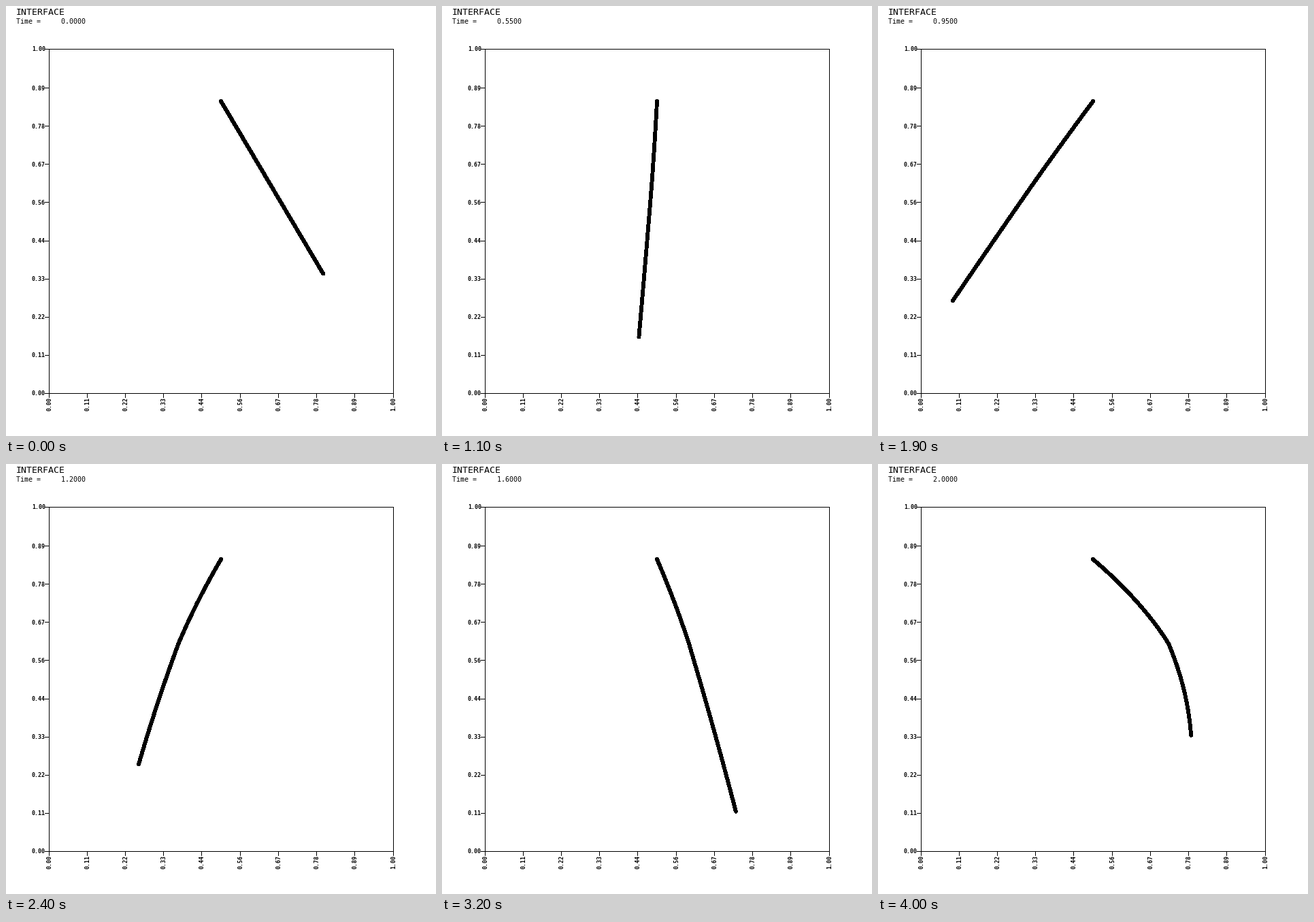
Write a matplotlib script that moves like this. It is 632 px wide and 632 px high and loops after 4.1 s.

```python
import numpy as np
import matplotlib.pyplot as plt
from matplotlib.animation import FuncAnimation

SIZE, DPI = 632, 64
PX = 72 / DPI                      # points per pixel
LEFT, RIGHT = 63, 569
PIVOT_X, PIVOT_Y = 316, 140
KNEE_DROP = 124                    # the filament bends at this depth
LAST, DT = 40, 0.05


def cosd(degrees):
    return np.cos(np.radians(degrees))


def tip(step):
    """Offset of the free end: a swing plus the bounce of a stretchy cord."""
    tau = step - 19.05
    c = cosd(10.12 * tau)
    x = -(181 + 0.2 * tau) * c - 25 * c ** 4
    a = 9.18 * (step - 19.3)
    y = 320 - 2 * cosd(a) - 47 * cosd(2 * a) + 22 * cosd(3 * a)
    return x, y


def knee_lead(step):
    """How far the knee runs ahead of the straight line to the tip."""
    whip = 42 * (step / LAST) ** 3 * cosd(9.5 * (step - LAST))
    return whip - 5 * np.sin(np.radians(18 * step))


def bowed(start, end, bow):
    u = np.linspace(0, 1, 40)
    x = start[0] + (end[0] - start[0]) * u + 4 * bow * u * (1 - u)
    y = start[1] + (end[1] - start[1]) * u
    return x, y


def filament(step):
    tip_x, tip_y = tip(step)
    lead = knee_lead(step)
    knee = (tip_x * KNEE_DROP / tip_y + lead, KNEE_DROP)
    upper = bowed((0, 0), knee, 0.2 * lead)
    lower = bowed(knee, (tip_x, tip_y), 0.14 * lead)
    x, y = np.hstack([upper, lower])
    return PIVOT_X + x, PIVOT_Y + y


fig = plt.figure(figsize=(SIZE / DPI, SIZE / DPI), dpi=DPI, facecolor="white")
ax = fig.add_axes([0, 0, 1, 1])
ax.set_xlim(0, SIZE)
ax.set_ylim(SIZE, 0)
ax.axis("off")


def thin(xs, ys):
    ax.plot(xs, ys, color="black", lw=PX, antialiased=False, snap=False,
            solid_capstyle="butt", solid_joinstyle="miter")


def label(x, y, text, pitch, **kw):
    """Monospaced text whose characters are `pitch` pixels apart."""
    return ax.text(x, y, text, family="DejaVu Sans Mono", color="black",
                   fontsize=pitch / 0.602 * PX, ha="left", va="baseline",
                   rotation_mode="anchor", **kw)


a, b = LEFT + 0.5, RIGHT + 0.5
thin([a, b, b, a, a], [a, a, b, b, a])

for i in range(10):
    x = int(LEFT + (RIGHT - LEFT) * i / 9) + 0.5
    y = LEFT + RIGHT + 1 - x
    thin([x, x], [RIGHT, RIGHT + 7])
    thin([LEFT - 6, LEFT + 1], [y, y])
    label(x + 3, 595, f"{i / 9:.2f}", 5, rotation=90, weight="bold")
    label(38, y + 3, f"{i / 9:.2f}", 5, weight="bold")

label(15, 13, "INTERFACE", 8)
clock = label(15, 26, "", 6)
body, = ax.plot([], [], color="black", lw=4.8 * PX, antialiased=False,
                solid_capstyle="round", solid_joinstyle="round")


def draw(step):
    body.set_data(*filament(step))
    clock.set_text(f"Time ={step * DT:11.4f}")
    return body, clock


anim = FuncAnimation(fig, draw, frames=LAST + 1, interval=100,
                     repeat=True, repeat_delay=0, blit=False)
plt.show()
```
